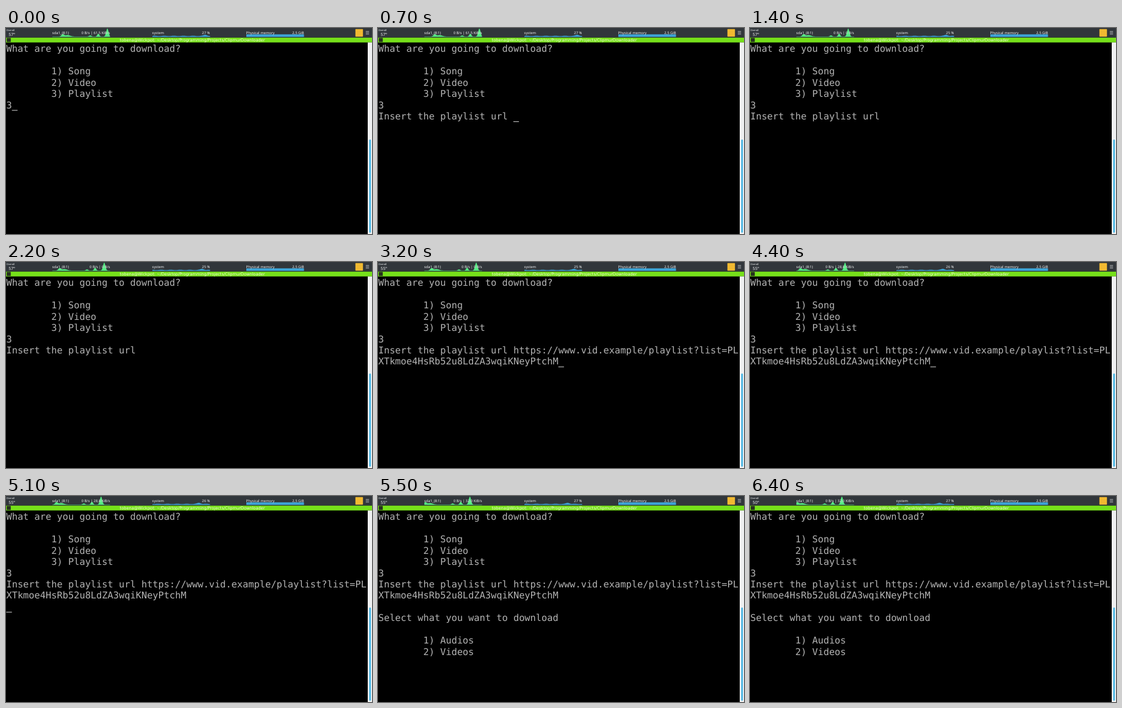
An HTML page that plays this animation: 600 by 338 pixels, repeating every 6500 ms.

```html
<!DOCTYPE html>
<html lang="en">
<head>
<meta charset="utf-8">
<title>Terminal download menu</title>
<style>
  html, body { margin: 0; width: 100%; height: 100%; overflow: hidden; background: #000; }
  svg { display: block; width: 100vw; height: 100vh; }
  text { white-space: pre; text-rendering: geometricPrecision; }
  .term { font: 15.33px "DejaVu Sans Mono", monospace; fill: #b4b4b4; }
  .panel { font: 5.85px "Noto Sans", sans-serif; fill: #eff0f1; }
  .title { font: 6.6px "DejaVu Sans", sans-serif; fill: #f4ffd8; }
</style>
</head>
<body>
<svg id="stage" viewBox="0 0 600 338" preserveAspectRatio="none"></svg>
<script>
const LOOP = 6500, BLINK = 600;
const COLS = 64, ROWS = 14;
const LEFT = 0.45, COL = 9.225, BASE = 39.1, ROW = 18.48;
const FLOOR = 14.6;          // bottom of the panel graphs
const SPAN = 94.5;           // width of a graph
const SHIFT = 5.2;           // graph travel per sample
const GREEN = "#54ea82", BLUE = "#3da5d9", GREY = "#b4b4b4";
const stage = document.getElementById("stage");

// Terminal transcript; a key press restarts the cursor blink
const steps = [
  { at: 0, key: true, text: "What are you going to download?\n\n\t1) Song\n\t2) Video\n\t3) Playlist\n3" },
  { at: 400, key: true, text: "\nInsert the playlist url " },
  { at: 3200, key: true, text: "https://www.vid.example/playlist?list=PLXTkmoe4HsRb52u8LdZA3wqiKNeyPtchM" },
  { at: 4600, key: true, text: "\n" },
  { at: 5400, text: "\nSelect what you want to download\n\n\t1) Audios\n\t2) Videos\n" }
];

// Sensor readings, one per sample
const rates = ["61,5 KiB/s", "0 B/s", "28,8 KiB/s", "32,0 KiB/s"];
const loads = [27, 25, 26, 27];
const temps = [57, 55, 50];

function add(tag, attrs, content) {
  const el = document.createElementNS("http://www.w3.org/2000/svg", tag);
  for (const key in attrs) el.setAttribute(key, attrs[key]);
  if (content) el.textContent = content;
  return stage.appendChild(el);
}
const rect = (x, y, width, height, fill, rx = 0) => add("rect", { x, y, width, height, fill, rx });
const label = (x, y, content, anchor = "start", cls = "panel") =>
  add("text", { x, y, class: cls, "text-anchor": anchor }, content);

// Graph heights at a distance x from the graph's left edge
const hump = (x, centre, height, width) => height * Math.exp(-(((x - centre) / width) ** 2));
const diskHeight = x => 0.6 + hump(x, 17, 3.6, 3) + hump(x, 25, 2.4, 6) +
  hump(x, 62, 1.9, 2.5) + hump(x, 75.3, 4.5, 2.4) + hump(x, 90.2, 13, 2.7);
const loadHeight = x => 1.6 + 0.3 * Math.sin(x / 2.5) + hump(x, 87, 1.8, 4);

function area(left, height, shift) {
  let path = `M${left} ${FLOOR}`;
  for (let x = 0; x <= SPAN; x += 0.5) path += `L${left + x} ${FLOOR - height(x + shift)}`;
  return `${path}V${FLOOR}Z`;
}

// Top panel
rect(0, 0, 600, 15.8, "#31363b");
const disk = add("path", { fill: GREEN });
const load = add("path", { fill: BLUE });
rect(394, 10.4, SPAN, FLOOR - 10.4, BLUE);

label(0.8, 4.6, "Overall").style.fontSize = "4.1px";
const temp = label(9.6, 13, "", "middle");
temp.style.fontSize = "6.8px";
label(75.8, 9.8, "sda1_(8:1)");
const rate = label(170.6, 9.8, "", "end");
label(239.6, 9.8, "system");
const cpu = label(334.4, 9.8, "", "end");
label(393.6, 9.8, "Physical memory");
label(488.6, 9.8, "2,5 GiB", "end");
rect(572.8, 1.8, 12.4, 12.4, "#f1b931", 0.8);
for (let i = 0; i < 3; i++) rect(589.8, 5.2 + i * 2.2, 5.4, 0.9, "#b9bcbe");

// Window title and scrollbar
rect(0, 15.8, 600, 7.9, "#76e01a");
rect(1.2, 16.4, 6.6, 6.4, "#26301f");
label(305.5, 22, "tobena@Wickpot: ~/Desktop/Programming/Projects/ClipmurDownloader", "middle", "title");
rect(593, 23.7, 7, 314.3, "#eff0f1");
rect(595.4, 183, 2.8, 153, "#45b5e6", 1.4);

// Terminal
const rows = Array.from({ length: ROWS }, (_, i) => label(LEFT, BASE + i * ROW, "", "start", "term"));
const cursor = rect(0, 0, COL, 1.2, GREY);

function wrap(text) {
  return text.replace(/\t/g, " ".repeat(8)).split("\n")
    .flatMap(line => line.match(new RegExp(`.{1,${COLS}}`, "g")) || [""]);
}

function drawTerminal(t) {
  const done = steps.filter(step => step.at <= t);
  const lines = wrap(done.map(step => step.text).join(""));
  rows.forEach((row, i) => { row.textContent = lines[i] || ""; });

  const pressed = done.filter(step => step.key).pop().at;
  const lit = Math.floor((t - pressed) / BLINK) % 2 === 0;
  const last = lines.length - 1;
  cursor.setAttribute("visibility", lit ? "visible" : "hidden");
  cursor.setAttribute("x", LEFT + lines[last].length * COL);
  cursor.setAttribute("y", BASE + last * ROW + 3);
}

function drawPanel(t) {
  const sample = Math.floor((t + 600) / 2000);
  disk.setAttribute("d", area(76, diskHeight, sample * SHIFT));
  load.setAttribute("d", area(240, loadHeight, sample * SHIFT));
  rate.textContent = `0 B/s | ${rates[sample]}`;
  cpu.textContent = `${loads[sample]} %`;
  temp.textContent = `${temps[Math.floor((t + 200) / 3000)]}°`;
}

const origin = performance.now();
function tick() {
  const t = Math.max(0, performance.now() - origin) % LOOP;
  drawTerminal(t);
  drawPanel(t);
  requestAnimationFrame(tick);
}
tick();
</script>
</body>
</html>
```
